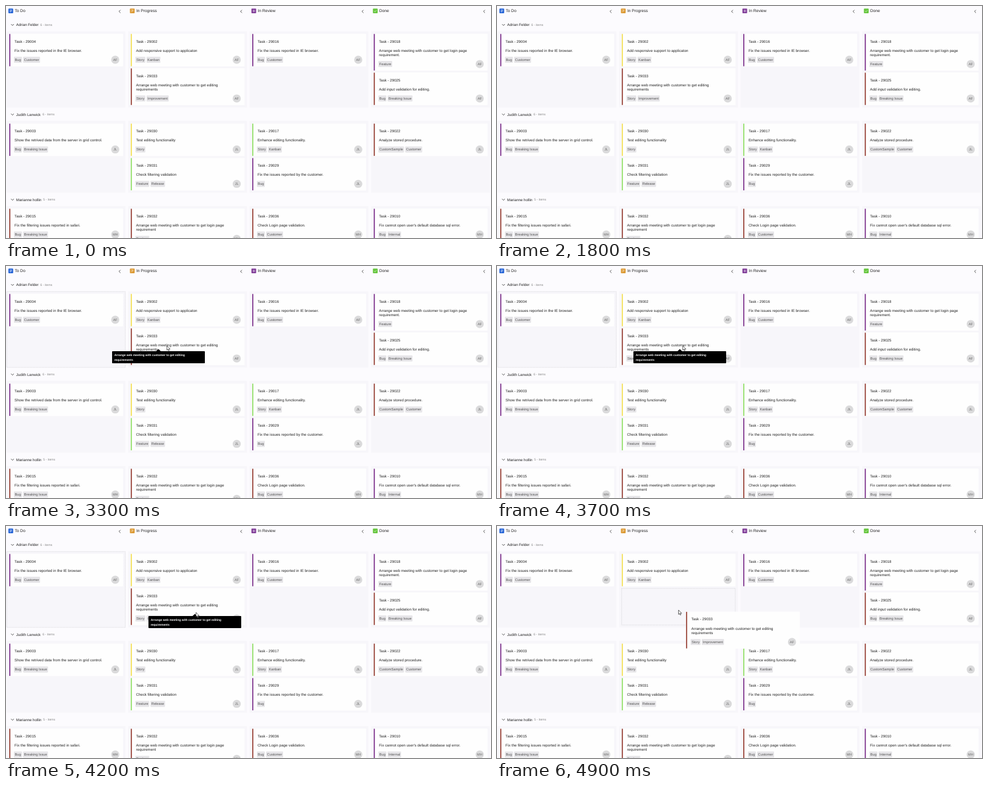
An HTML page that plays this animation: 800x384 px, repeating every 5000 ms.

```html
<!DOCTYPE html>
<html lang="en">
<head>
<meta charset="utf-8">
<title>Kanban board</title>
<style>
html, body { margin: 0; width: 100%; height: 100%; overflow: hidden; background: #fcfbfe; }
svg { display: block; width: 800px; height: 384px; }
text { font: 6.15px "Liberation Sans", Arial, sans-serif; fill: #222; text-rendering: geometricPrecision; white-space: pre; }
.head { font-size: 6.65px; }
.count { font-size: 5.2px; fill: #888; }
.tag { font-size: 5.75px; fill: #565656; }
.initials { font-size: 5.5px; fill: #686868; text-anchor: middle; }
.tip { font-size: 4.9px; font-weight: bold; fill: #fff; }
.panel { fill: #f7f6fa; }
.card { fill: #fefefe; }
.chip { fill: #e6e5e8; }
.avatar { fill: #dadadb; }
.line { fill: none; stroke: #444; stroke-width: .9; }
.dashed { fill: none; stroke: #d2d2d6; stroke-width: .7; stroke-dasharray: 1.5 1; }
</style>
</head>
<body>
<svg id="stage" viewBox="0 0 800 384"></svg>
<script>
const stage = document.getElementById("stage");
const STEP = 200.4, GAP = 3;
const PURPLE = "#701d80", MAROON = "#8c2c20", YELLOW = "#f1dc42", GREEN = "#86dc56";

function add(parent, tag, attrs = {}, text) {
  const el = document.createElementNS("http://www.w3.org/2000/svg", tag);
  for (const key in attrs) el.setAttribute(key, attrs[key]);
  if (text) el.textContent = text;
  parent.append(el);
  return el;
}
const group = (parent, x = 0, y = 0) => add(parent, "g", { transform: `translate(${x} ${y})` });
const rect = (parent, x, y, width, height, attrs) => add(parent, "rect", { x, y, width, height, ...attrs });
const write = (parent, x, y, text, cls = "") => add(parent, "text", { x, y, class: cls }, text);
const path = (parent, d, attrs) => add(parent, "path", { d, ...attrs });

function drawCard(parent, x, y, [id, color, desc, tags], initials) {
  const g = group(parent, x, y);
  const lines = desc.split("\n");
  const extra = (lines.length - 1) * 7.1;
  g.height = 54 + extra;
  rect(g, 0, 0, 188, g.height, { class: "card", rx: 1 });
  rect(g, .3, .3, 1.6, g.height - .6, { fill: color });
  write(g, 8.9, 14.6, "Task - " + id);
  lines.forEach((line, i) => write(g, 8.9, 29.8 + i * 7.1, line));
  let left = 7.8;
  for (const tag of tags.split(",")) {
    const chip = rect(g, left, 38 + extra, 0, 10, { class: "chip", rx: .8 });
    const label = write(g, left + 1.5, 45 + extra, tag, "tag");
    const width = label.getComputedTextLength() + 3;
    chip.setAttribute("width", width);
    left += width + 2;
  }
  add(g, "circle", { cx: 175, cy: 43 + extra, r: 6.7, class: "avatar" });
  write(g, 175, 45 + extra, initials, "initials");
  return g;
}

const columns = [
  ["To Do", "#2463d6", "M2 2.5H6M2 4H6M2 5.5H4.5"],
  ["In Progress", "#dc9a35", "M2 2.5H5.5M2 5.5L5.5 3.5"],
  ["In Review", "#84429b", "M2 4H6M4 2V6"],
  ["Done", "#67c63f", "M1.8 4L3.4 5.6L6.2 2.6"]
];
const meeting = "Arrange web meeting with customer to get ";
const editing = meeting + "editing\nrequirements";
const lanes = [
  { name: "Adrian Felder", initials: "AF", count: "6", countX: 56.5, y: 42, height: 126, cells: [
    [["29004", PURPLE, "Fix the issues reported in the IE browser.", "Bug,Customer"]],
    [["29002", YELLOW, "Add responsive support to applicaton", "Story,Kanban"],
     ["29033", MAROON, editing, "Story,Improvement"]],
    [["29016", PURPLE, "Fix the issues reported in IE browser.", "Bug,Customer"]],
    [["29018", PURPLE, meeting + "login page\nrequirement.", "Feature"],
     ["29025", MAROON, "Add input validation for editing.", "Bug,Breaking Issue"]]
  ] },
  { name: "Judith Lanwick", initials: "JL", count: "6", countX: 60.3, y: 190.4, height: 118.6, cells: [
    [["29003", PURPLE, "Show the retrived data from the server in grid control.", "Bug,Breaking Issue"]],
    [["29030", YELLOW, "Test editing functionality", "Story"],
     ["29031", GREEN, "Check filtering validation", "Feature,Release"]],
    [["29017", GREEN, "Enhance editing functionality.", "Story,Kanban"],
     ["29029", PURPLE, "Fix the issues reported by the customer.", "Bug"]],
    [["29022", MAROON, "Analyze stored procedure.", "CustomSample,Customer"]]
  ] },
  { name: "Marianne hollin", initials: "MH", count: "5", countX: 61.3, y: 331.3, height: 60, cells: [
    [["29015", MAROON, "Fix the filtering issues reported in safari.", "Bug,Breaking Issue"]],
    [["29032", MAROON, meeting + "login page\nrequirement", "Feature"]],
    [["29036", MAROON, "Check Login page validation.", "Bug,Customer"]],
    [["29010", PURPLE, "Fix cannot open user's default database sql error.", "Bug,Internal"]]
  ] }
];

columns.forEach(([name, color, mark], i) => {
  const g = group(stage, i * STEP);
  const icon = group(g, 4, 4.2);
  rect(icon, 0, 0, 7.8, 7.8, { fill: color, rx: 1 });
  path(icon, mark, { fill: "none", stroke: "#fff", "stroke-opacity": .75, "stroke-width": .8 });
  write(g, 14.5, 10.3, name, "head");
  path(g, "M188.8 6.6L186.4 9L188.8 11.4", { class: "line" });
});

let held;
for (const lane of lanes) {
  path(stage, `M8.4 ${lane.y - 12}l2.3 2.3l2.3 -2.3`, { class: "line" });
  write(stage, 16.8, lane.y - 8.8, lane.name);
  write(stage, lane.countX, lane.y - 9.1, lane.count + " - items", "count");
  lane.cells.forEach((cell, i) => {
    const x = 1 + i * STEP;
    let y = lane.y + 4;
    rect(stage, x, lane.y, 196, lane.height, { class: "panel" });
    for (const task of cell) {
      const card = drawCard(stage, x + 4.2, y, task, lane.initials);
      if (task[0] === "29033") held = card;
      y += card.height + GAP;
    }
  });
}

const focusBox = rect(stage, 1.2, 42.3, 195.6, 125.6, { class: "dashed" });
const dropBox = rect(stage, 205.6, 103.3, 187.4, 60.6, { class: "dashed" });
const dragged = drawCard(stage, 0, 0, lanes[0].cells[1][1], "AF");
const tip = group(stage);
path(tip, "M-4.5 .2L-.5 -3.6L3.5 .2Z");
rect(tip, -77, 0, 153, 20, { rx: 1 });
editing.split("\n").forEach((line, i) => write(tip, -73.3, 7.7 + i * 7.8, line, "tip"));
const cursor = path(stage, "M0 0V7.3L1.7 5.8L2.8 8.4L4 7.9L2.9 5.4H5.2Z",
  { fill: "#fff", stroke: "#222", "stroke-width": .7 });

// Pointer path: time, x, y
const route = [
  [2600, 140, 132], [3200, 252, 132], [3300, 265, 132], [3600, 302, 132], [3700, 306, 132],
  [4100, 312, 140], [4200, 313, 143], [4500, 313, 143], [4700, 306, 139], [4900, 299, 139]
];
function pointer(t) {
  if (t <= route[0][0]) return route[0].slice(1);
  const i = route.findIndex(key => key[0] >= t);
  const [t0, x0, y0] = route[i - 1], [t1, x1, y1] = route[i];
  const k = (t - t0) / (t1 - t0);
  return [Math.round(x0 + (x1 - x0) * k), Math.round(y0 + (y1 - y0) * k)];
}
const show = (el, on) => el.setAttribute("visibility", on ? "visible" : "hidden");
const move = (el, x, y) => el.setAttribute("transform", `translate(${x} ${y})`);

function frame(now) {
  const t = Math.floor(now % 5000 / 100) * 100;
  const dragging = t >= 4700;
  const [x, y] = pointer(t);
  const [tipX, tipY] = pointer(t - 100);  // the tooltip trails the pointer
  show(cursor, t >= 2100);
  show(focusBox, t >= 2100 && !dragging);
  show(tip, t >= 3200 && t < 4400);
  show(held, !dragging);
  show(dropBox, dragging);
  show(dragged, dragging);
  move(cursor, x + .4, y);
  move(tip, tipX, tipY + 9);
  move(dragged, x + 12.6, y + 2.8);
  requestAnimationFrame(frame);
}
frame(0);
</script>
</body>
</html>
```
